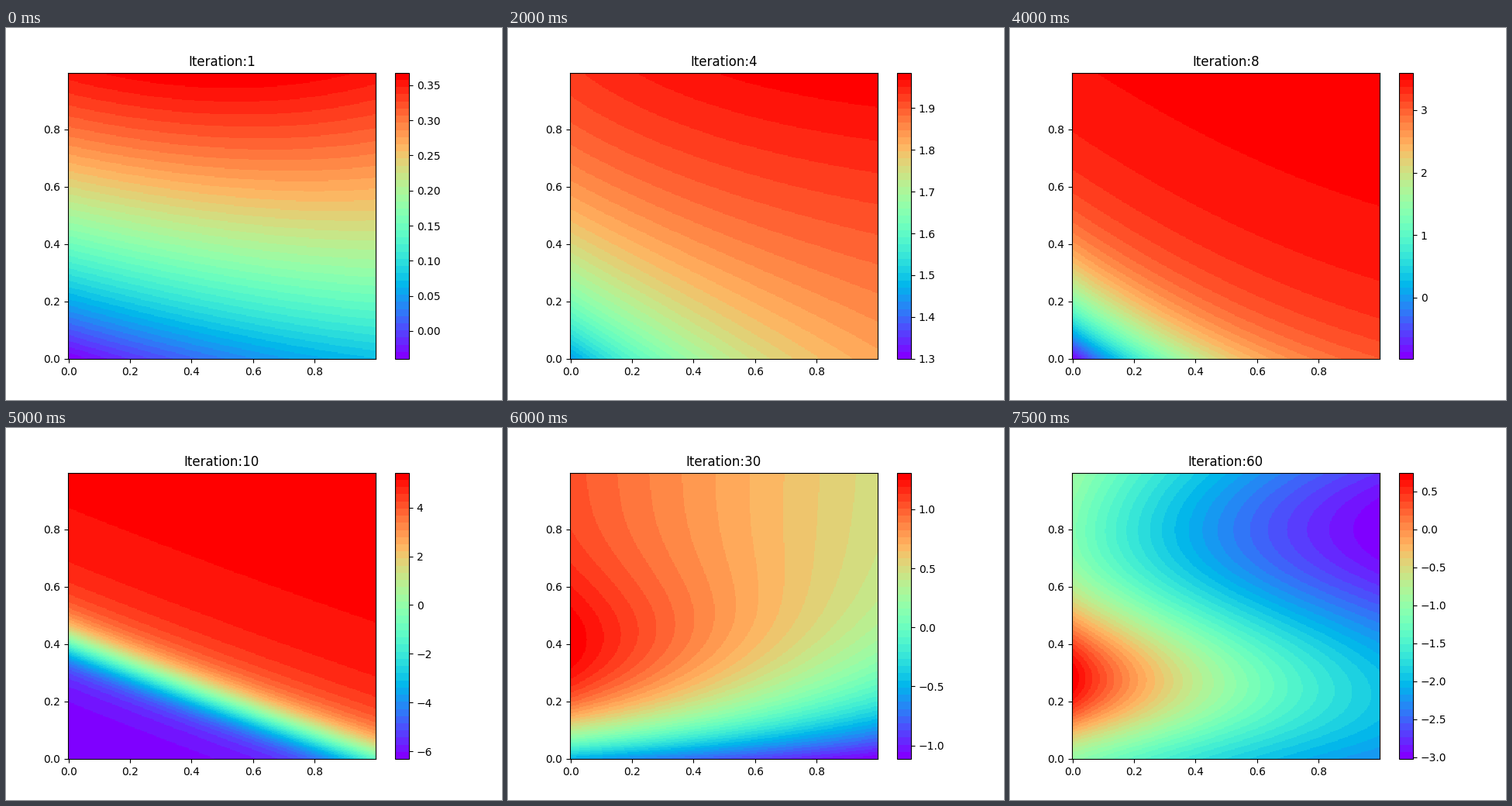
Recreate the animation shown at these times as a matplotlib script. Size 640 by 480 pixels, loop 8000 ms.

```python
import matplotlib.pyplot as plt
import numpy as np
from matplotlib.animation import FuncAnimation

SIZE = 300
BANDS = 40

axis = np.arange(SIZE) / SIZE
X, Y = np.meshgrid(axis, axis)


def normalize(u):
    return (u - u.min()) / np.ptp(u)


def mix(a, b, t):
    return a + (b - a) * t


def span(left, right, decay, bump=0.0):
    """Lead from the left edge's profile to the right edge's one."""
    weight = np.expm1(-decay * X) / np.expm1(-decay)
    return normalize(mix(left, right, weight) + bump * X * (1 - X))


def sigmoid(z):
    return 1 / (1 + np.exp(-z))


def layers():
    left = 1.2 * Y - 0.25 * Y**3
    right = 0.27 + 0.95 * Y - 0.265 * Y**2
    return span(left, right, 0.01, bump=0.14)


def corner():
    left = 1.02 * (1 - np.exp(-2.1 * Y))
    right = 0.70 + 0.34 * Y - 0.04 * Y**2
    return span(left, right, 1.9)


def steep_corner():
    left = 1.07 * (1 - np.exp(-1.8 * Y))
    right = 0.685 + 0.42 * Y - 0.11 * Y**2
    return span(left, right, 1.6)


def plateau():
    s = Y + 0.72 * X - 0.2 * X**2
    return normalize(0.93 * np.tanh(3 * s) + 0.047 * s)


def front():
    s = Y + 0.43 * X - 0.03 * X**2
    return normalize(0.70 * sigmoid(24 * (s - 0.40))
                     + 0.24 * sigmoid(11 * (s - 0.46)) + 0.043 * s)


def plume():
    hump = 0.17 * np.exp(-((Y - 0.35) / 0.3)**2)
    left = 0.22 + 0.78 * (0.85 * np.tanh(5.5 * Y) + hump)
    right = 0.66 * np.tanh(3.2 * Y)
    return span(left, right, 0.2)


def wave():
    d = Y - 0.28
    left = 0.755 + 0.245 * np.cos(8.17 * d - 3.98 * d**2)
    right = 0.145 * (1 + np.cos(np.pi * (Y - 0.22) / 0.58))
    return span(left, right, 1.1)


# iteration: lowest value, highest value, normalized field
KEYS = {
    1: (-0.040, 0.368, layers()),
    4: (1.450, 1.9845, corner()),
    6: (0.657, 1.522, steep_corner()),
    8: (-0.982, 3.600, plateau()),
    10: (-6.318, 5.432, front()),
    20: (-1.9, 2.2, normalize(mix(front(), plume(), 0.6))),
    30: (-1.116, 1.311, plume()),
    60: (-3.027, 0.744, wave()),
}
ITERATIONS = [*range(1, 10), *range(10, 61, 10)]


def state(iteration):
    """Blend the neighbouring keys; the value range grows geometrically."""
    before = max(k for k in KEYS if k <= iteration)
    after = min(k for k in KEYS if k >= iteration)
    t = (iteration - before) / max(after - before, 1)
    low_a, high_a, field_a = KEYS[before]
    low_b, high_b, field_b = KEYS[after]
    middle = mix(low_a + high_a, low_b + high_b, t) / 2
    half = (high_a - low_a)**(1 - t) * (high_b - low_b)**t / 2
    field = normalize(mix(field_a, field_b, t))
    return middle - half, middle + half, field


fig, ax = plt.subplots(figsize=(6.4, 4.8), dpi=100)
edge = 0.5 / SIZE
image = ax.imshow(layers(), cmap=plt.get_cmap("rainbow", BANDS),
                  origin="lower", extent=(-edge, 1 - edge, -edge, 1 - edge),
                  aspect="auto", interpolation="nearest")
fig.colorbar(image)
title = ax.set_title("")


def update(frame):
    # The first step is held twice as long as the others.
    iteration = ITERATIONS[max(frame - 1, 0)]
    low, high, field = state(iteration)
    image.set_data(mix(low, high, field))
    image.set_clim(low, high)
    title.set_text(f"Iteration:{iteration}")
    return image, title


anim = FuncAnimation(fig, update, frames=len(ITERATIONS) + 1, interval=500,
                     repeat=True, repeat_delay=0, blit=False)
plt.show()
```
